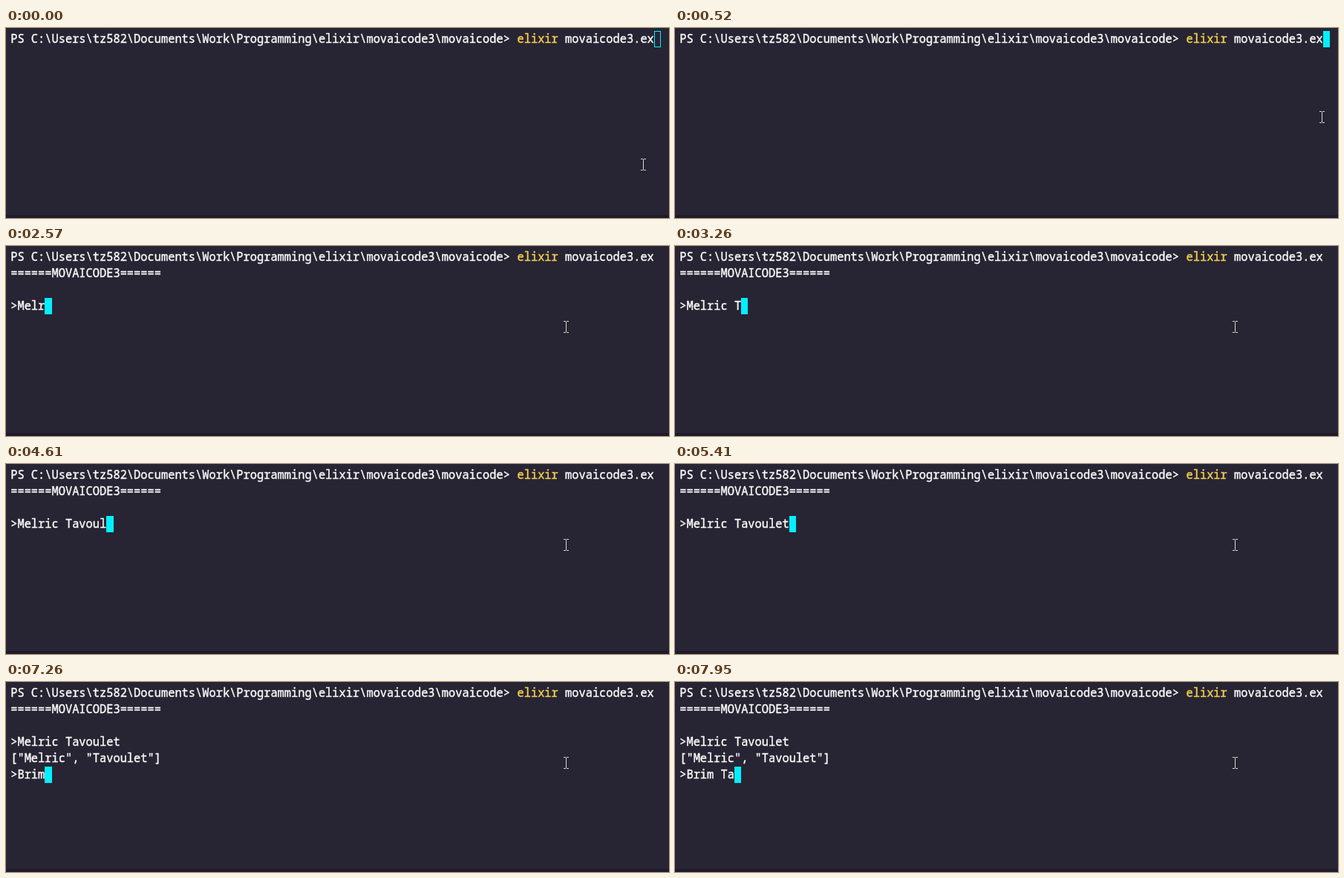
Recreate the animation shown at these times as an HTML page with a canvas. Size 893 by 256 pixels, loop 8 s.

```html
<!DOCTYPE html>
<html lang="en">
<head>
<meta charset="utf-8">
<title>Terminal session</title>
<style>
  html, body { margin: 0; width: 100%; height: 100%; overflow: hidden; background: #272433; }
  canvas { display: block; }
</style>
</head>
<body>
<canvas id="stage" width="893" height="256"></canvas>
<script>
const ctx = document.getElementById('stage').getContext('2d');
const LOOP = 8000, CELL = 9.22, LEFT = 6.2, TOP = 4, ROW = 22, BASELINE = 16;
const BG = '#272433', STRIP = '#201b2b', INK = '#f7f7f5', YELLOW = '#f3cd4f', CYAN = '#00f0ff';

const PROMPT = 'PS C:\\Users\\tz582\\Documents\\Work\\Programming\\elixir\\movaicode3\\movaicode> ';
const COMMAND = 'elixir', ARGUMENT = ' movaicode3.ex';
const FIRST = 'Melric', LAST = 'Tavoulet';

// Moments at which the shell changes state
const FOCUS = 350, ENTER = 940, START = 2000, REPLY = 6560;
const KEYS_1 = [2190, 2330, 2430, 2570, 2750, 2850, 3080, 3260, 3490, 3920, 4240, 4420, 4610, 4890, 5410];
const KEYS_2 = [6790, 6980, 7120, 7260, 7480, 7770, 7950];

// Stepped pointer moves: start, end, number of steps, from, bend, to
const MOVES = [
  { start: 30, end: 520, steps: 7, from: [859, 184], bend: [848, 146], to: [872, 120] },
  { start: 850, end: 1080, steps: 6, from: [872, 120], bend: [820, 106], to: [755, 109] }
];

const colX = col => Math.round(LEFT + col * CELL);
const rowY = row => TOP + row * ROW;
const typed = (text, keys, t) => text.slice(0, keys.filter(k => k <= t).length);

// A thin outline in the same colour gives the text its medium weight
function write(text, col, row, color = INK) {
  const x = LEFT + col * CELL, y = rowY(row) + BASELINE;
  ctx.fillStyle = ctx.strokeStyle = color;
  ctx.fillText(text, x, y);
  ctx.strokeText(text, x, y);
}

function drawCursor(col, row, filled = true) {
  const x = colX(col), y = rowY(row), w = colX(col + 1) - x;
  ctx.fillStyle = CYAN;
  ctx.fillRect(x, y, w, ROW);
  if (!filled) {
    ctx.fillStyle = BG;
    ctx.fillRect(x + 1, y + 1, w - 2, ROW - 2);
  }
}

function pointerAt(t) {
  let pos = MOVES[0].from;
  for (const { start, end, steps, from, bend, to } of MOVES) {
    if (t < start) break;
    const gap = (end - start) / (steps - 1);
    const u = Math.min(steps, Math.floor((t - start) / gap + 1e-6) + 1) / steps;
    const v = 1 - u;
    pos = from.map((a, i) => Math.round(v * v * a + 2 * u * v * bend[i] + u * u * to[i]));
  }
  return pos;
}

function drawPointer(t) {
  const [x, y] = pointerAt(t);
  ctx.fillStyle = '#d9d8cf';
  ctx.fillRect(x - 1, y - 7, 1, 14);
  for (const edge of [y - 8, y + 7]) {
    ctx.fillRect(x - 4, edge, 3, 1);
    ctx.fillRect(x, edge, 3, 1);
  }
}

function draw(t) {
  ctx.fillStyle = BG;
  ctx.fillRect(0, 0, 893, 256);
  ctx.fillStyle = STRIP;
  ctx.fillRect(0, 252, 893, 4);

  ctx.font = '500 15.36px "Noto Sans Mono", "DejaVu Sans Mono", monospace';
  ctx.textBaseline = 'alphabetic';
  ctx.lineWidth = 0.45;
  ctx.lineJoin = 'round';
  const commandCol = PROMPT.length, argCol = commandCol + COMMAND.length;
  write(PROMPT, 0, 0);
  write(COMMAND, commandCol, 0, YELLOW);
  write(ARGUMENT, argCol, 0);

  if (t < ENTER) {
    drawCursor(argCol + ARGUMENT.length, 0, t >= FOCUS);
  } else if (t < START) {
    drawCursor(0, 1);
  } else {
    const line1 = '>' + typed(`${FIRST} ${LAST}`, KEYS_1, t);
    write('======MOVAICODE3======', 0, 1);
    write(line1, 0, 3);
    if (t < REPLY) {
      drawCursor(line1.length, 3);
    } else {
      const line2 = '>' + typed('Brim Ta', KEYS_2, t);
      write(`["${FIRST}", "${LAST}"]`, 0, 4);
      write(line2, 0, 5);
      drawCursor(line2.length, 5);
    }
  }
  drawPointer(t);
}

const origin = performance.now();
function tick() {
  draw((performance.now() - origin) % LOOP);
  requestAnimationFrame(tick);
}
tick();
</script>
</body>
</html>
```
